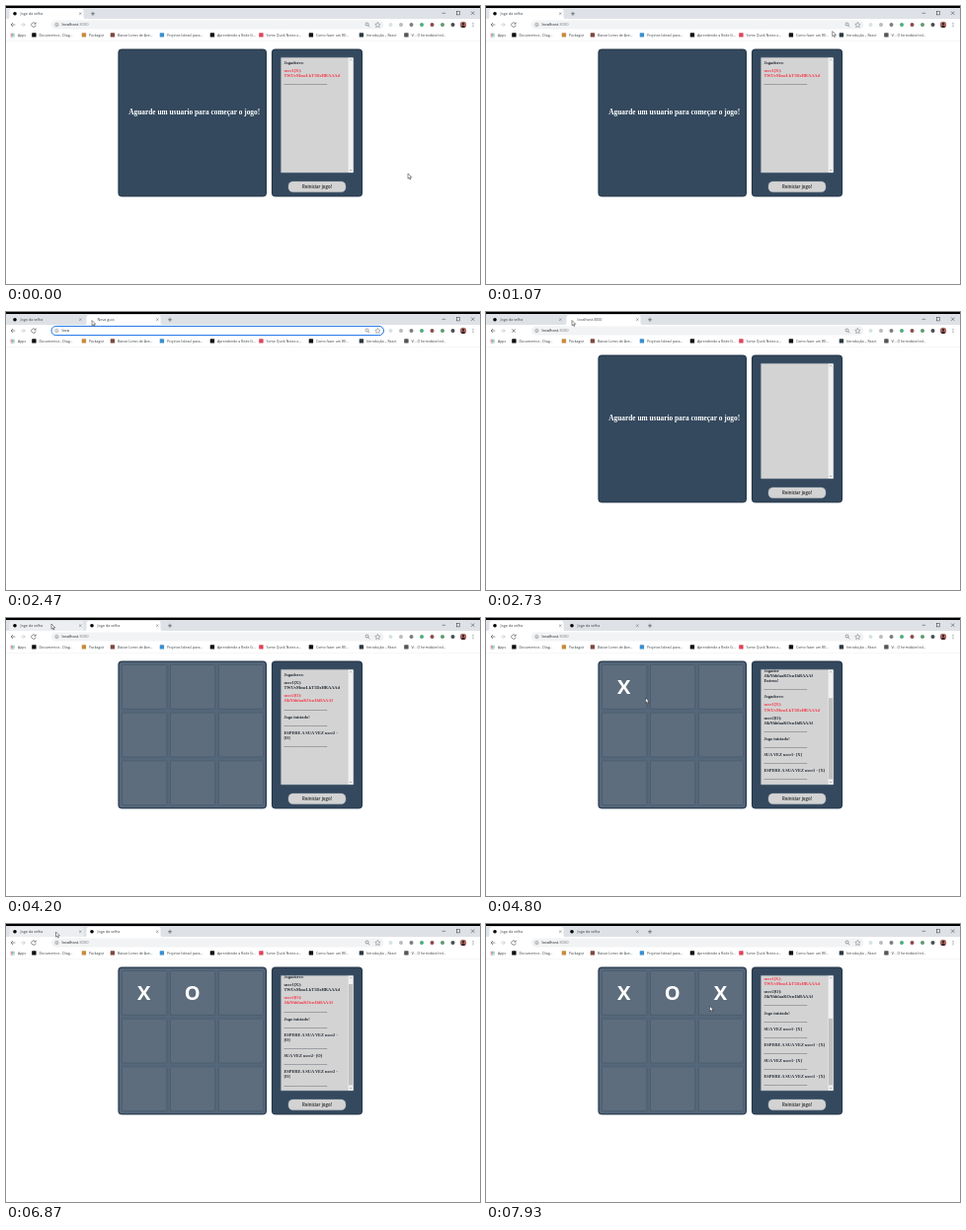
An HTML page for the animation above (8 s loop, 480 px wide and 282 px high).

```html
<!DOCTYPE html>
<html lang="pt">
<head>
<meta charset="utf-8">
<title>Jogo da velha</title>
<style>
html, body { margin: 0; width: 100%; height: 100%; overflow: hidden; background: #fff; }
svg { display: block; width: 100%; height: 100%; }
.ui { font-family: "Open Sans", sans-serif; fill: #3c4043; }
.page { font-family: "Liberation Serif", serif; font-weight: bold; white-space: pre; }
.mark { font: bold 20px "Open Sans", sans-serif; fill: #fff; text-anchor: middle; }
</style>
</head>
<body>
<svg id="stage" viewBox="0 0 480 282"></svg>
<script>
const stage = document.getElementById('stage');
const LOOP = 8000, STEP = 200 / 3;

function el(parent, tag, attrs = {}, text) {
  const node = document.createElementNS('http://www.w3.org/2000/svg', tag);
  for (const k in attrs) node.setAttribute(k, attrs[k]);
  if (text !== undefined) node.textContent = text;
  parent.appendChild(node);
  return node;
}
const group = (parent = stage) => el(parent, 'g');
const rect = (p, x, y, width, height, fill, rx = 0, more = {}) =>
  el(p, 'rect', { x, y, width, height, fill, rx, ...more });
const dot = (p, cx, cy, r, fill) => el(p, 'circle', { cx, cy, r, fill });
const line = (p, d, stroke = '#5f6368', width = .6) =>
  el(p, 'path', { d, stroke, 'stroke-width': width, fill: 'none' });
const label = (p, x, y, size, text, more = {}) =>
  el(p, 'text', { x, y, 'font-size': size, class: 'ui', ...more }, text);
const show = (node, on) => node.setAttribute('display', on ? 'inline' : 'none');
const cross = (p, x, y, r, color, w) =>
  line(p, `M${x - r} ${y - r}l${2 * r} ${2 * r}M${x - r} ${y + r}l${2 * r} ${-2 * r}`, color, w);

// Browser frame
rect(stage, 0, 0, 480, 282, '#fff');
rect(stage, 0, 0, 480, 13, '#dee1e6');
rect(stage, 0, 0, 480, 2, '#000');
line(stage, 'M441.5 7.3h3.6', '#333', .5);
rect(stage, 456.3, 5.5, 3.4, 3.4, 'none', 0, { stroke: '#333', 'stroke-width': .5 });
cross(stage, 472.7, 7.2, 1.7, '#333', .5);

function makeTab(x) {
  const g = group();
  const back = el(g, 'path', { d: `M${x} 13q1.5 0 1.5-2V5q0-2 2-2h71q2 0 2 2v6q0 2 1.5 2z` });
  const icon = dot(g, x + 7, 7.8, 1.8, '#000');
  const title = label(g, x + 12.5, 9.1, 3.7, '');
  cross(g, x + 73.3, 7.7, 1.2, '#5f6368', .5);
  return { g, back, icon, title };
}
const tabs = [makeTab(2), makeTab(80)];
const plus = group();
const plusGlow = dot(plus, 0, 7.8, 4.3, '#b9bdc3');
line(plus, 'M-2 7.8h4M0 5.8v4', '#3c4043', .6);

// Toolbar
line(stage, 'M9.3 19H5M7 17l-2 2 2 2', '#5f6368', .7);
line(stage, 'M15 19h4.3M17.3 17l2 2-2 2', '#bdc1c6', .7);
const reload = line(stage, 'M29.6 17.6a2.2 2.2 0 1 0 .5 1.9M30.2 16.5v1.7h-1.8', '#5f6368', .7);
const stop = cross(stage, 28, 19, 1.7, '#5f6368', .7);
const pill = rect(stage, 46, 14.4, 336.5, 9.2, '#f1f3f4', 4.6);
el(stage, 'circle', { cx: 51.4, cy: 19, r: 1.7, fill: 'none', stroke: '#5f6368', 'stroke-width': .45 });
line(stage, 'M51.4 18.7v1.3M51.4 17.9v.4', '#5f6368', .45);
const url = label(stage, 56.5, 20.4, 4, '');
const host = el(url, 'tspan', { fill: '#202124' });
const port = el(url, 'tspan', { fill: '#777b80' });
el(stage, 'circle', { cx: 365.6, cy: 18.5, r: 1.5, fill: 'none', stroke: '#5f6368', 'stroke-width': .6 });
line(stage, 'M366.7 19.6l1.6 1.6');
el(stage, 'path', { d: 'M376.4 16.4l.8 1.8 1.9.2-1.4 1.3.4 1.9-1.7-1-1.7 1 .4-1.9-1.4-1.3 1.9-.2z',
  fill: 'none', stroke: '#5f6368', 'stroke-width': .45 });
['#d5e3e3', '#b9bbbe', '#7b7d80', '#4fae80', '#8a4b4b', '#5b9b72', '#4a4d51'].forEach((c, i) =>
  dot(stage, 389.5 + i * 10.5, 19, 2, c));
dot(stage, 463, 19, 3.2, '#b06a62');
dot(stage, 463, 18.1, 1.2, '#2c2528');
el(stage, 'path', { d: 'M460.8 21.3q2.2-3.4 4.4 0-2.2 1.6-4.4 0z', fill: '#2c2528' });
[17.2, 19, 20.8].forEach(y => dot(stage, 473, y, .5, '#5f6368'));

// Bookmarks
for (let i = 0; i < 9; i++)
  rect(stage, 4.7 + i % 3 * 1.4, 27.7 + Math.floor(i / 3) * 1.4, 1, 1, ['#d9534a', '#4a8fd9', '#53a667'][i % 3]);
label(stage, 12, 30.8, 3.5, 'Apps');
[
  [33.5, '#111', 'Documentos - Diag...'],
  [84, '#c98a3c', 'Packagist'],
  [113, '#7c4a3f', 'Baixar Livros de Ave...'],
  [163, '#3a8fd0', 'Projetos (ideas) para...'],
  [214, '#111', 'Aprendendo a Rede G...'],
  [263.5, '#e0445a', 'Some Quick Notes o...'],
  [314, '#111', 'Como fazer um RE...'],
  [365, '#2b3a42', 'Introdução – React'],
  [410.5, '#555', 'Vi - O formidável ed...']
].forEach(([x, color, text]) => {
  rect(stage, x - 7.3, 27.2, 4.4, 4.4, color, .6);
  label(stage, x, 30.8, 3.5, text);
});
line(stage, 'M0 35.5h480', '#eceef0', .5);

// Game page
const page = group();
const frame = { stroke: '#26394c', 'stroke-width': 1.2 };
const board = rect(page, 114, 44.1, 149.4, 148.8, '#34495e', 3.5, frame);
rect(page, 269.5, 44.1, 91, 148.8, '#34495e', 3.5, frame);
const wait = el(page, 'text', { x: 124.3, y: 110.3, 'font-size': 7.35, class: 'page', fill: '#fff' },
  'Aguarde um usuario para começar o jogo!');
const grid = group(page);
for (let i = 0; i < 9; i++)
  rect(grid, 117.6 + i % 3 * 48.9, 47.4 + Math.floor(i / 3) * 48.7, 45.2, 44.9, '#5d6d7e', 1,
    { stroke: '#4c5e70', 'stroke-width': 1 });
const marks = [...'XOX'].map((c, i) =>
  el(grid, 'text', { x: 139.7 + i * 48.9, y: 77.1, class: 'mark' }, c));

rect(page, 278.4, 52.3, 73.4, 116.8, '#d3d3d3', .5, { stroke: '#8d99a5', 'stroke-width': .5 });
rect(page, 346.6, 52.6, 4.9, 116.2, '#f1f1f1');
const thumb = rect(page, 347, 57, 4.1, 10, '#c1c1c1');
line(page, 'M348.1 55.3l1-1 1 1M348.1 166l1 1 1-1', '#606060', .5);
const clip = el(el(stage, 'defs'), 'clipPath', { id: 'view' });
rect(clip, 279, 52.6, 67, 116.2, '#000');
const log = el(page, 'g', { 'clip-path': 'url(#view)' });
rect(page, 286, 178, 58, 10.8, '#d3d3d3', 4.6, { stroke: '#a9b0b6', 'stroke-width': .4 });
label(page, 315, 185, 4.4, 'Reiniciar jogo!', { 'text-anchor': 'middle', 'font-weight': 600, style: 'fill:#222' });

// Message lists; a leading "!" marks the player's own entry
const RULE = '_'.repeat(20);
const ID1 = 'TWUvMmcLkT5DzHRAAAd', ID2 = 'JikNhbfaaKOcn1hBAAAf';
const ONE = `user1[X]:\n${ID1}`, TWO = `user2[O]:\n${ID2}`;
const START = ['Jogo iniciado!', RULE];
const TURN1 = ['SUA VEZ user1- [X]', RULE], HOLD1 = ['ESPERE A SUA VEZ user1 - [X]', RULE];
const TURN2 = ['SUA VEZ user2- [O]', RULE], HOLD2 = ['ESPERE A SUA VEZ user2 -\n[O]', RULE];
const alone = ['Jogadores:', '!' + ONE, RULE];
const first = [...alone, `Jogador\n${ID2}\nEntrou!`, RULE,
  'Jogadores:', '!' + ONE, TWO, RULE, ...START, ...TURN1];
const second = ['Jogadores:', ONE, '!' + TWO, RULE, ...START, ...HOLD2];
const first2 = [...first, ...HOLD1], first3 = [...first2, ...TURN1], first4 = [...first3, ...HOLD1];
const second2 = [...second, ...TURN2], second3 = [...second2, ...HOLD2];

let shown;
function drawLog(list) {
  if (list === shown) return;
  shown = list;
  log.replaceChildren();
  const inner = group(log);
  let y = 59, last = y;
  for (const item of list) {
    const own = item[0] === '!';
    for (const row of item.slice(own ? 1 : 0).split('\n')) {
      el(inner, 'text', { x: 281.4, y: row === RULE ? y - 1 : y, 'font-size': 4.4, class: 'page',
        fill: own ? '#f5384a' : '#222a33' }, row);
      last = y;
      y += 5.1;
    }
    y += 3;
  }
  const over = Math.max(0, last - 164.5), k = 106 / (116 + over);
  inner.setAttribute('transform', `translate(0 ${-over})`);
  show(thumb, over > 0);
  thumb.setAttribute('y', 57.5 + over * k);
  thumb.setAttribute('height', 116 * k);
}

// Pointer
const arrow = el(stage, 'path', { d: 'M0 0v5.2l1.2-1.1.8 1.9.9-.4-.8-1.8h1.7z',
  fill: '#fff', stroke: '#111', 'stroke-width': .45 });
const path = [
  [0, 407, 170], [670, 356, 26], [1000, 356, 26], [1800, 87, 8.5], [3000, 87, 8.5],
  [3400, 186, 74], [3530, 186, 74], [3870, 50, 3.5], [3930, 46, 6], [4260, 46, 6],
  [4530, 161.5, 81], [5000, 161.5, 81], [5330, 106, 7], [5560, 106, 7],
  [6200, 187, 80], [6420, 187, 80], [6800, 50.5, 8], [6940, 50.5, 8],
  [7270, 180, 106], [7300, 180, 106], [7730, 226.5, 83.3], [LOOP, 226.5, 83.3]
];
function pointer(t) {
  const i = path.findIndex(p => p[0] > t);
  const [t0, x0, y0] = path[i - 1], [t1, x1, y1] = path[i];
  const u = (t - t0) / (t1 - t0), e = u * u * (3 - 2 * u);
  return [x0 + (x1 - x0) * e, y0 + (y1 - y0) * e];
}

// Each row: start, active tab, message list, marks placed (-1 before the game starts)
const scenes = [
  [0, 0, alone, -1], [2260, 1, null, -1], [2725, 1, [], -1], [2795, 1, second, 0],
  [4260, 0, first, 0], [4660, 0, first, 1], [4795, 0, first2, 1],
  [5330, 1, second2, 1], [6325, 1, second2, 2], [6395, 1, second3, 2],
  [6930, 0, first3, 2], [7860, 0, first3, 3], [7925, 0, first4, 3]
];

function draw(time) {
  const t = Math.floor((time + 4) / STEP) * STEP;
  const [, active, list, count] = scenes.findLast(s => s[0] <= t + 4);
  const [x, y] = pointer(Math.min(t, LOOP - 1));
  const opened = t >= 2256, blank = !list, loading = opened && t < 2790;
  arrow.setAttribute('transform', `translate(${x} ${y})`);

  tabs.forEach((tab, i) => {
    const over = y < 13 && x > 2 + i * 78 && x < 80 + i * 78;
    tab.back.setAttribute('fill', i === active ? '#fff' : over ? '#eceef1' : '#dee1e6');
    show(tab.icon, !(i && loading));
    tab.title.textContent = !i || !loading ? 'Jogo da velha' : blank ? 'Nova guia' : 'localhost:3000';
  });
  show(tabs[1].g, opened);
  plus.setAttribute('transform', `translate(${opened ? 166 : 88} 0)`);
  show(plusGlow, !opened && y < 13 && Math.abs(x - 88) < 5);

  const typed = 'localhost:3000'.slice(0, blank ? Math.max(0, Math.floor((t - 2390) / 18)) : 14);
  host.textContent = typed.slice(0, 9);
  port.textContent = typed.slice(9);
  pill.setAttribute('fill', blank ? '#fff' : '#f1f3f4');
  pill.setAttribute('stroke', blank ? '#1a73e8' : 'none');
  show(stop, loading && !blank);
  show(reload, !loading || blank);

  show(page, !blank);
  if (blank) return;
  board.setAttribute('fill', count < 0 ? '#34495e' : '#55677a');
  show(wait, count < 0);
  show(grid, count >= 0);
  marks.forEach((m, i) => show(m, i < count));
  drawLog(list);
}

const began = performance.now();
function tick() {
  draw((performance.now() - began) % LOOP);
  requestAnimationFrame(tick);
}
tick();
</script>
</body>
</html>
```
